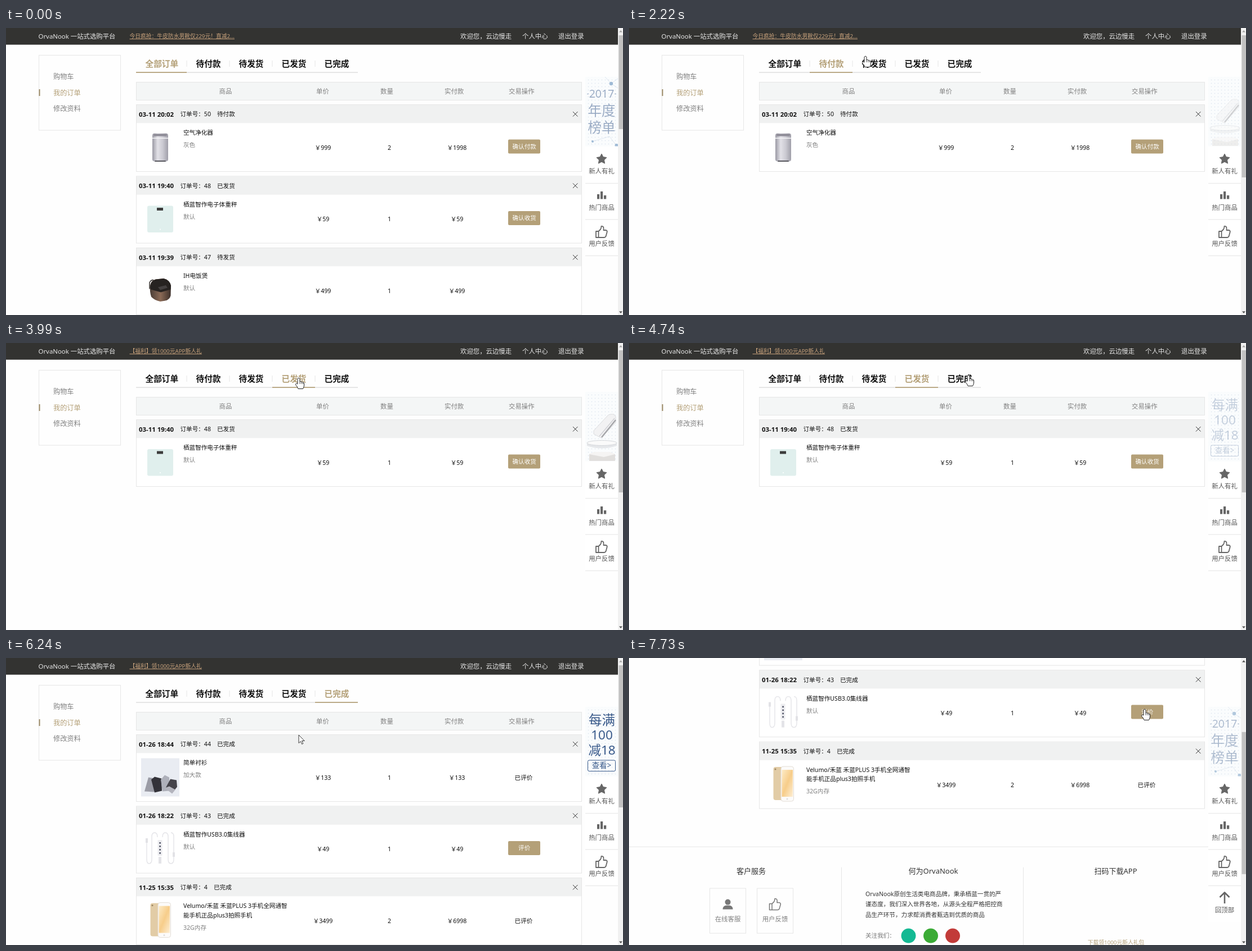
An HTML page that plays this animation: 1096x511 px, repeating every 7990 ms.

```html
<!DOCTYPE html>
<html lang="zh-CN">
<head>
<meta charset="utf-8">
<title>订单</title>
<style>
html, body { margin: 0; width: 100%; height: 100%; overflow: hidden; background: #fefefe; }
svg { display: block; width: 1096px; height: 511px; font-family: 'Noto Sans', 'Noto Sans CJK SC', sans-serif; }
text { white-space: pre; }
.mid { text-anchor: middle; }
.bold { font-weight: 700; }
.link { text-decoration: underline; }
.slide text { font-weight: 300; text-anchor: middle; }
</style>
</head>
<body>
<svg id="stage" viewBox="0 0 1096 511"></svg>
<script>
const GOLD = '#b4a078', GRAY = '#808080', LINE = '#e6e6e6', BLUE = '#38598a';
const LOOP = 7990, STEPS = 32;
const $ = id => document.getElementById(id);

// Markup helpers; text is placed by its vertical centre.
const text = (x, cy, s, size = 10.6, fill = '#111', cls = '') =>
  `<text x="${x}" y="${cy + size * .37}" font-size="${size}" fill="${fill}" class="${cls}">${s}</text>`;
const mid = (x, cy, s, size, fill, cls = '') => text(x, cy, s, size, fill, 'mid ' + cls);
const rect = (x, y, w, h, fill, more = '') =>
  `<rect x="${x}" y="${y}" width="${w}" height="${h}" fill="${fill}" ${more}/>`;
const box = (x, y, w, h, fill = 'none', stroke = LINE) => rect(x, y, w, h, fill, `stroke="${stroke}"`);
const dot = (x, y, r, fill) => `<circle cx="${x}" cy="${y}" r="${r}" fill="${fill}"/>`;
const path = (d, fill, stroke = 'none', w = 1) =>
  `<path d="${d}" fill="${fill}" stroke="${stroke}" stroke-width="${w}" stroke-linejoin="round"/>`;
const group = (s, more = '') => `<g ${more}>${s}</g>`;
const at = (x, y, s) => group(s, `transform="translate(${x} ${y})"`);
const gradient = (id, colors, dir = '') => `<linearGradient id="${id}" ${dir}>` +
  colors.map((c, i) => `<stop offset="${i / (colors.length - 1)}" stop-color="${c}"/>`).join('') + '</linearGradient>';

const thumbUp = (color, w) => path(
  'M-10-1H-5.5V10H-10ZM-5.5-1L-2-4.5Q-.5-6.5-.5-10Q4.5-11 3.5-3H8Q10.5-2 9.5 1L7.5 8Q6.5 10 4.5 10H-5.5', 'none', color, w);
const star = path('M' + Array.from({ length: 10 }, (_, i) => {
  const r = i % 2 ? 4.8 : 9.5, a = i * Math.PI / 5;
  return `${r * Math.sin(a)} ${-r * Math.cos(a)}`;
}).join('L') + 'Z', '#666', '#666');

const pictures = {
  purifier: rect(260, 51, 28, 50, 'url(#silver)', 'rx="4"') + rect(262, 52, 24, 4, '#8d8b96', 'rx="2"') +
    rect(260, 59, 28, 1.5, '#f4f4f6') + rect(264, 99.5, 20, 2, '#55555c', 'rx="1"'),
  scale: rect(251, 52.5, 46, 47.5, '#e0efed', 'rx="3"') + rect(268, 56, 11, 5, '#3c3c3c') + dot(274, 94.5, 1, '#fff'),
  cooker: path('M256 67Q257 58 266 56L280 54.5Q291 57 293 67L292.5 85Q291 92 283 94L274 95.5Q263 93 258 87Q255 78 256 67Z', 'url(#bronze)') +
    path('M256 70Q257 58 266 56L280 54.5Q291 57 293 68L292.5 74L275 79L257 74Z', '#272321') +
    path('M270 70L284 66.5L287 71L274 75Z', '#454141') + path('M255 73V62Q257 57 262 57', 'none', '#35302d', 1.5),
  gift: rect(251, 52, 39, 47, '#d2482f') + path('M252 66H289M258 53V98', 'none', '#e37a4d') +
    path('M264 59H292L298 66V92L292 99H264L257 92V66Z', '#79b6c8', '#dc7845', 2.5) +
    path('M261 90L270 77L276 85L285 70L294 91Z', '#e8eee9') + path('M266 65L288 94M289 64L270 82', 'none', '#3f789b', 2) +
    dot(266, 89, 4, '#db8b59') + dot(288, 70, 3, '#d8573e') + dot(277, 78, 3, '#f3d9b5'),
  shirts: rect(240, 42, 68, 68, '#e9ecf2') + path('M253 76L265 78L264 102L246 101Z', '#9b9ca6') +
    path('M264 75L276 78L277 100L264 103L258 80Z', '#333239') + path('M282 72L290 76L290 100L278 101L275 80Z', '#aeb0ba') +
    path('M292 79L303 81L304 93L295 104L284 94Z', '#45444b') + path('M282 95L290 92L301 98L295 105Z', '#b3b4bd'),
  hub: path('M250 62V94Q250 102 254 102Q259 102 259 94V54Q259 47 264 47Q269 47 269 55M278 55Q278 47 283 47Q288 47 288 54' +
    'V94Q288 102 293 102Q298 102 298 94V54Q298 47 293 47', 'none', '#e4e4e8', 1.4) +
    rect(269.5, 60, 8, 28, '#ededf0', 'rx="1"') + [64, 70, 76, 82].map(y => rect(272.3, y, 2.6, 2.6, '#4a4e60')).join('') +
    rect(248, 57, 4, 8, '#e2e2e6') + rect(296, 82, 4, 8, '#e2e2e6') + rect(271, 90, 5, 12, '#e4e4e8'),
  phone: rect(256.5, 45, 26, 59, '#e2cca6', 'rx="4"') + dot(260, 49, 1.5, '#9d8663') +
    rect(270, 44, 22.5, 62, '#fcfbfa', 'rx="4" stroke="#e3ddd5"') + rect(271.5, 50, 19.5, 48, 'url(#amber)') + dot(281, 102, 1.5, '#ddd')
};

const PAY = '待付款', SEND = '待发货', SENT = '已发货', DONE = '已完成';
const orders = [
  ['03-11 20:02', 50, PAY, 'purifier', ['空气净化器'], '灰色', 999, 2, '确认付款'],
  ['03-11 19:40', 48, SENT, 'scale', ['栖蓝智作电子体重秤'], '默认', 59, 1, '确认收货'],
  ['03-11 19:39', 47, SEND, 'cooker', ['IH电饭煲'], '默认', 499, 1, ''],
  ['03-11 19:39', 45, SEND, 'gift', ['禾岭满喜零食礼盒 1.199千克'], '8味入', 178, 1, ''],
  ['01-26 18:44', 44, DONE, 'shirts', ['简单衬衫'], '加大款', 133, 1, '已评价'],
  ['01-26 18:22', 43, DONE, 'hub', ['栖蓝智作USB3.0集线器'], '默认', 49, 1, '评价'],
  ['11-25 15:35', 4, DONE, 'phone', ['Velumo/禾蓝 禾蓝PLUS 3手机全网通智', '能手机正品plus3拍照手机'], '32G内存', 3499, 2, '已评价']
];
const tabs = ['全部订单', PAY, SEND, SENT, DONE];
const tabX = [231, 321, 397, 473, 549, 625];

function card([date, no, status, picture, title, spec, price, count, action], i) {
  const button = action && action !== '已评价';
  return at(0, 136.5 + i * 127.5,
    box(231.5, 0, 791, 119, '#fff') + rect(232, .5, 790, 32.3, '#f0f1f1') +
    text(236, 17, date, 11.4, '#111', 'bold') + text(309.5, 17, '订单号：' + no) + text(no > 9 ? 375 : 369, 17, status) +
    path('M1007 12.5L1015.5 21M1015.5 12.5L1007 21', 'none', '#333') + pictures[picture] +
    title.map((s, n) => text(315, 50 + n * 16.3, s)).join('') + text(315, 55.7 + title.length * 16.3, spec, 10.6, GRAY) +
    mid(563, 76.5, '￥' + price) + mid(681, 76.5, count) + mid(801, 76.5, '￥' + price * count) +
    (button ? rect(892, 62, 57, 25, GOLD, 'rx="2"') : '') + mid(button ? 920.7 : 919.5, button ? 74.5 : 76.5, action, 10.6, button ? '#fff' : '#111'));
}

const header = rect(0, 0, 1087, 29.7, '#333331') + text(57.5, 14.5, 'OrvaNook 一站式选购平台', 11.4, '#e6e6e6') +
  group(
    group(text(219.5, 14.5, '今日疯抢：牛皮防水男靴仅229元！直减2...', 9.78, '#c8a27c', 'link') +
      text(219.5, 44.5, '【福利】领1000元APP新人礼', 9.78, '#c8a27c', 'link'), 'id="promo"'), 'clip-path="url(#bar)"') +
  text(807, 14.5, '欢迎您，云边慢走', 11.4, '#e6e6e6') + text(917, 14.5, '个人中心', 11.4, '#e6e6e6') + text(981, 14.5, '退出登录', 11.4, '#e6e6e6');

const menu = box(58.5, 48.5, 145, 133.5) + text(84, 86.5, '购物车', 12.2, GRAY) +
  text(84, 115, '我的订单', 12.2, GOLD) + text(84, 143.5, '修改资料', 12.2, GRAY) + rect(58.5, 109, 2, 12, '#9b8a66');

const tabBar = rect(231, 78.5, 394, 1.2, '#d8d8d8') + tabX.slice(1, 5).map(x => rect(x - .5, 58, 1, 11, LINE)).join('') +
  tabs.map((s, i) => group(text(tabX[i] + 16.5, 63.5, s, 14.67, 'currentColor', 'bold'), `id="tab${i}"`)).join('') +
  rect(0, 78.2, 1, 1.7, GOLD, 'id="underline"');

const columns = box(231.5, 96.5, 791, 32, '#f4f6f6') +
  [[378.5, '商品'], [551, '单价'], [665, '数量'], [779, '实付款'], [893, '交易操作']].map(([x, s]) => text(x, 113, s, 11.4, GRAY)).join('');

const lists = tabs.map((name, i) =>
  group(orders.filter(o => !i || o[2] === name).slice(0, 3).map(card).join(''), `id="list${i}"`)).join('');

const footer = group(
  rect(0, 578, 1087, 1, LINE) + rect(377, 615, 1, 150, LINE) + rect(700, 615, 1, 150, LINE) +
  mid(217, 622, '客户服务', 13, '#333') + mid(540.5, 622, '何为OrvaNook', 13, '#333') + mid(864.5, 622, '扫码下载APP', 13, '#333') +
  box(143.5, 652.5, 64, 80) + box(227.5, 652.5, 64, 80) +
  at(175.5, 681, dot(0, -4, 5, '#777') + path('M-9 9Q-9 3-3 2H3Q9 3 9 9Z', '#777')) + at(259.5, 681, thumbUp('#777', 1.5)) +
  mid(175.5, 707, '在线客服', 11.4, GRAY) + mid(259.5, 707, '用户反馈', 11.4, GRAY) +
  ['OrvaNook原创生活类电商品牌，秉承栖蓝一贯的严', '谨态度，我们深入世界各地，从源头全程严格把控商', '品生产环节，力求帮消费者甄选到优质的商品']
    .map((s, i) => text(420, 662 + i * 18.5, s, 10.6, '#333')).join('') +
  text(420, 736, '关注我们：', 10.6, '#777') + dot(496.5, 737, 13, '#14b993') + dot(536, 737, 13, '#3bab36') + dot(575, 737, 13, '#c23b39') +
  mid(865, 749, '下载领1000元新人礼包', 9.78, GOLD), 'id="footer"');

const slides = [
  path('M1087 90L1075 99L1087 107M1075 99L1064 87M1042 202L1072 193L1084 209', 'none', '#b3c6de', .8) +
    dot(1075, 99, 3.2, '#3f76ac') + dot(1084.5, 209, 3, '#3f76ac') + dot(1042, 202, 2, '#3f76ac') +
    text(1058, 117, '2017', 19.5, BLUE) + rect(1032, 117, 3, 1, BLUE) + rect(1081, 117, 3, 1, BLUE) +
    text(1058, 147, '年度', 24.5, BLUE) + text(1058, 177, '榜单', 24.5, BLUE),
  ['热销', '好评', '人气'].map((s, i) => text(1058, 113 + i * 37, s, 21.3, BLUE) + rect(1037, 125.7 + i * 37, 42, 1, BLUE)).join(''),
  path('M1044 156L1069 129Q1072 126 1080 127L1083 131V142L1057 169L1044 162Z', '#f2f2f3', '#d5d6d9', .8) +
    path('M1058 168L1083 137', 'none', '#a5a6aa', 2.5) + path('M1054 166L1081 134', 'none', '#cfd0d4', 1.5) +
    path('M1032 178V183Q1058 192 1085 183V178', '#e5e7ea') + `<ellipse cx="1058.5" cy="178" rx="26.5" ry="4.5" fill="#fafafa" stroke="#d3d6da"/>` +
    path('M1036 198L1046 194H1072L1082 198V210H1036Z', '#e1dfdd') + path('M1036 198L1046 194H1072L1082 198L1062 203Z', '#f5f4f3'),
  text(1058.5, 110, '每满', 23.5, BLUE) + text(1058.5, 137, '100', 22.5, BLUE) + text(1058.5, 164, '减18', 22.5, BLUE) +
    rect(1033.5, 182, 49, 19.5, 'none', `rx="2.5" stroke="${BLUE}"`) + text(1058, 191.5, '查看&gt;', 13.5, BLUE)
].map((s, i) => group(s, `id="slide${i}" class="slide"`)).join('');

const side = rect(1029, 87, 58, 319, '#fff') + rect(1029, 87, 58, 123.5, '#fafcfd') + rect(1029, 87, 58, 123.5, 'url(#dots)') +
  group(slides, 'clip-path="url(#banner)"') + [276, 340.5, 405].map(y => rect(1029, y, 58, 1, LINE)).join('') +
  at(1058, 233.5, star) + rect(1050, 296, 4.2, 8.5, '#666') + rect(1056, 291, 4.2, 13.5, '#666') + rect(1062, 298, 4.2, 6.5, '#666') +
  at(1058, 363, thumbUp('#666', 1.8)) +
  ['新人有礼', '热门商品', '用户反馈'].map((s, i) => mid(1058, 255 + i * 64.5, s, 11.4, '#555')).join('') +
  group(rect(1029, 406, 58, 64, '#fff') + path('M1058 437V418M1049.5 426L1058 417.5L1066.5 426', 'none', '#666', 2.6) + mid(1058, 449, '回顶部', 11.4, '#555'), 'id="toTop"');

const scrollbar = rect(1087, 0, 9, 511, '#f1f1f1') + rect(1088.5, 13, 7.5, 167, '#c1c1c1', 'id="thumb"') +
  `<path id="upArrow" d="M1089 7.5L1092 4L1095 7.5Z"/>` + path('M1089 504.5L1092 508L1095 504.5Z', '#505050');

const cursor = group(
  group(path('M0 0V14.5L3.4 11.4L5.6 16.4L7.8 15.4L5.6 10.5H10.2Z', '#fff', '#222', .9), 'id="arrow"') +
  group(path('M-2 11V1.5Q0-1.5 2 1.5V7Q4 5.5 5 7.5Q7 6.5 7.5 8.5Q9.5 8 9.5 10V14Q9 17 7.5 19.5H-1Q-2 16-5.5 12.5Q-6 9-2 11Z', '#fff', '#222', 1) +
    path('M2 7V11M5 8V11M7.5 9V11', 'none', '#222', .8), 'id="hand"'), 'id="cursor"');

$('stage').innerHTML = '<defs><clipPath id="bar">' + rect(200, 0, 300, 29.7, '#000') + '</clipPath><clipPath id="banner">' +
  rect(1029, 87, 58, 123.5, '#000') + '</clipPath><pattern id="dots" width="6" height="6" patternUnits="userSpaceOnUse">' +
  dot(2.5, 2.5, .7, '#d3deea') + '</pattern>' + gradient('silver', ['#9b9aa5', '#e2e1e7', '#cac9d1', '#a09fa9']) +
  gradient('bronze', ['#4a3d36', '#8b6a56', '#3c302b']) + gradient('amber', ['#fdebc6', '#f7cd8a', '#fdeed4'], 'x2="1" y2="1"') + '</defs>' +
  rect(0, 0, 1096, 511, '#fefefe') + group(header + menu + tabBar + columns + lists + footer, 'id="page"') + side + scrollbar + cursor;

// Linear interpolation through [time, value, ...] keys.
function sample(keys, t) {
  const n = keys.findIndex(k => k[0] > t);
  if (n < 0) return keys.at(-1).slice(1);
  if (!n) return keys[0].slice(1);
  const a = keys[n - 1], b = keys[n], u = (t - a[0]) / (b[0] - a[0]);
  return a.slice(1).map((v, i) => v + (b[i + 1] - v) * u);
}

// All times below are in quarter-second steps.
const pointerKeys = [[1, 455, 330], [3, 420, 125], [4, 400, 54], [5, 374, 60], [6, 367, 62], [8, 367, 62],
  [9, 420, 50], [10, 447, 62], [11, 454, 68], [13, 454, 68], [15, 520, 62], [17, 520, 62], [18, 575, 58],
  [19, 603, 57], [20, 603, 57], [22, 535, 122], [23, 535, 122], [25, 520, 137], [26, 516, 154], [27, 516, 154],
  [29, 750, 128], [30, 875, 103], [31, 916, 91]];
const scrollKeys = [[25, 0], [26, 215], [27, 242.4]];
const promoKeys = [[13, 0], [15, -30]];
const fadeKeys = [
  [[0, .48], [1, .8], [2, .8], [4, 0], [29, 0], [31, .38]],
  [[3, 0], [5, 1], [7, 1], [9, 0]],
  [[8, 0], [10, 1], [16, 1], [18, 0]],
  [[17.5, 0], [19, .27], [21, 1], [27, 1], [29, 0]]
];
const clicks = [7, 11, 16, 20];

const show = (id, on) => $(id).setAttribute('display', on ? 'inline' : 'none');
const move = (id, x, y) => $(id).setAttribute('transform', `translate(${x} ${y})`);

function draw(now) {
  // The small lead absorbs the uneven length of the steps.
  const step = Math.floor((now % LOOP + 35) / LOOP * STEPS) % STEPS;
  const active = clicks.filter(c => step >= c).length;
  const [scroll] = sample(scrollKeys, step), [x, y] = sample(pointerKeys, step);
  tabs.forEach((_, i) => {
    show('list' + i, i === active);
    $('tab' + i).setAttribute('color', i === active ? GOLD : '#111');
  });
  $('underline').setAttribute('x', tabX[active]);
  $('underline').setAttribute('width', tabX[active + 1] - tabX[active]);
  move('page', 0, -scroll);
  move('promo', 0, sample(promoKeys, step)[0]);
  show('footer', active);
  show('toTop', scroll > 0);
  fadeKeys.forEach((keys, i) => $('slide' + i).setAttribute('opacity', sample(keys, step)[0]));
  $('thumb').setAttribute('y', 13 + scroll * .49);
  $('thumb').setAttribute('height', active ? 253 : 167);
  $('upArrow').setAttribute('fill', scroll ? '#505050' : '#a3a3a3');
  const pointing = y < 79 || x > 890;
  show('cursor', step > 0);
  show('hand', pointing);
  show('arrow', !pointing);
  move('cursor', x, y);
  requestAnimationFrame(draw);
}
requestAnimationFrame(draw);
</script>
</body>
</html>
```
